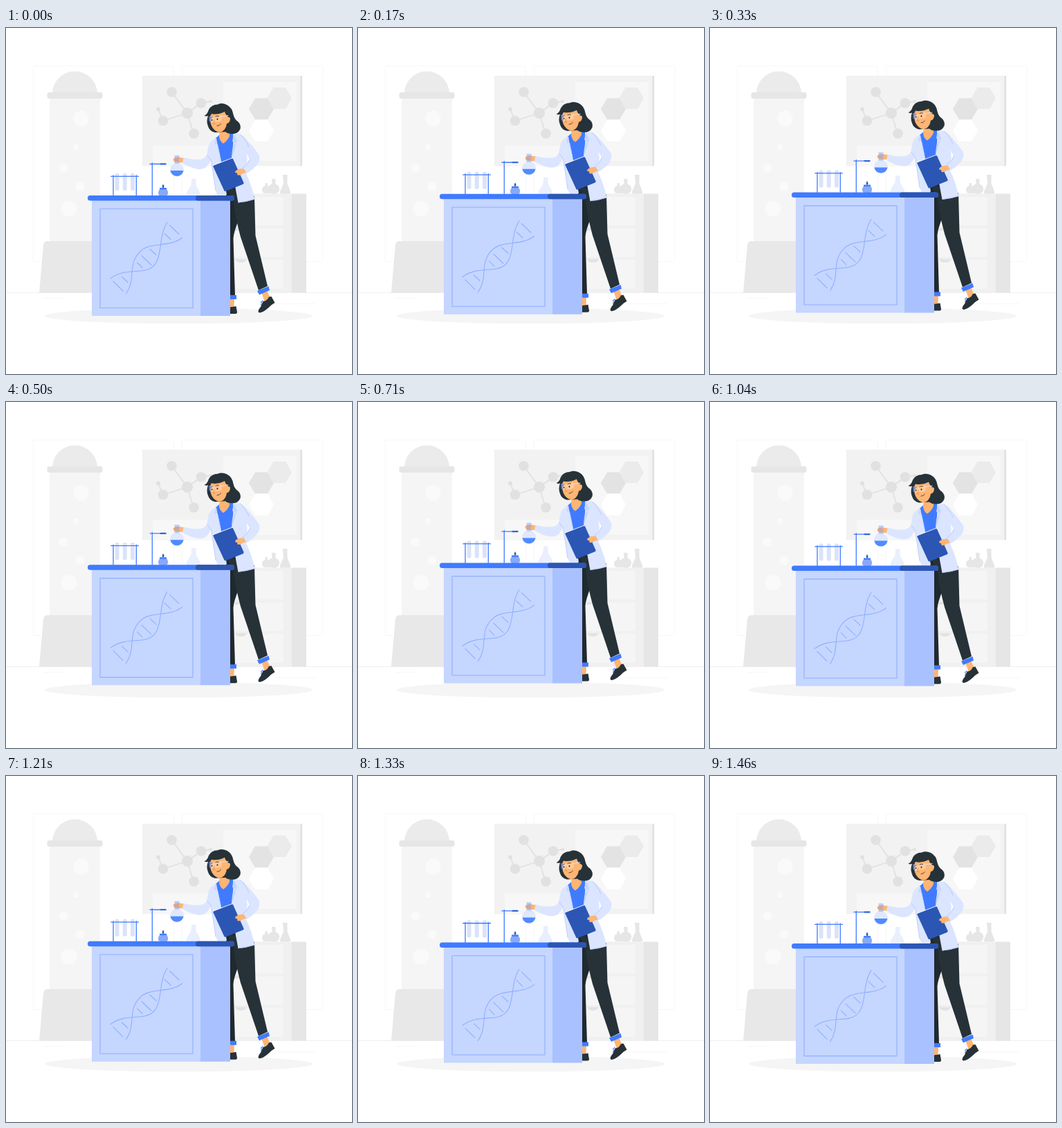
Write an HTML page that moves like this. It is 500 px wide and 500 px high and loops after 1.5 s.

```html
<!DOCTYPE html>
<html lang="en">
<head>
<meta charset="utf-8">
<title>Laboratory</title>
<style>
  html, body { margin: 0; height: 100%; overflow: hidden; background: #fff; }
  svg { display: block; width: 100%; height: 100%; }
  .line { fill: none; stroke-linecap: round; stroke-linejoin: round; }
</style>
</head>
<body>
<svg viewBox="0 0 500 500">
  <!-- room -->
  <g class="line" stroke="#f5f5f5" stroke-width=".8">
    <rect x="39" y="55" width="203.500" height="282.500" rx="3"/>
    <rect x="254.500" y="55" width="203.500" height="282.500" rx="3"/>
    <path stroke="#ebebeb" d="M0 382.500H500"/>
    <path d="M388 398.500H447M55 390.500H82"/>
  </g>
  <ellipse cx="249.500" cy="416" rx="193.500" ry="11.300" fill="#f5f5f5"/>

  <!-- bubble column -->
  <path fill="#f5f5f5" d="M63 101H136V309H63Z"/>
  <path fill="#ebebeb" d="M67 95A32.500 32.500 0 0 1 132 95Z"/>
  <rect x="59.500" y="93" width="80" height="9" rx="3" fill="#e6e6e6"/>
  <g fill="#fafafa">
    <circle cx="108.500" cy="131" r="11.300"/>
    <circle cx="101.500" cy="172" r="4"/>
    <circle cx="83" cy="202" r="6.500"/>
    <circle cx="107" cy="229" r="6.300"/>
    <circle cx="91" cy="261" r="11.300"/>
  </g>
  <path fill="#e8e8e8" d="M48 382.500L54 314Q54.500 308 60 308H139Q145 308 145.500 314L151 382.500Z"/>

  <!-- board -->
  <path fill="#f2f2f2" d="M197 69H426V199.500H197Z"/>
  <path fill="#e0e0e0" d="M425.500 69H428V199.500H425.500Z"/>
  <path fill="#f7f7f7" d="M314 78H420V192H314ZM212 170H302V199.500H212Z"/>
  <path fill="#e3e3e3" d="M351 117L360 101.500H378L387 117L378 132.500H360Z"/>
  <path fill="#ebebeb" d="M377.500 101.500L386.500 86H404L413 101.500L404 117H386.500Z"/>
  <path fill="#fff" d="M351 148.500L360 132.500H378L387 148.500L378 164H360Z"/>
  <g fill="#e1e1e1">
    <path class="line" stroke="#e1e1e1" stroke-width="1.800" d="M239.500 92.500L262 123L227 134L220 117.500M271 152.500L262 123L282 108.500L296 106"/>
    <circle cx="239.500" cy="92.500" r="7.300"/>
    <circle cx="227" cy="134" r="7.300"/>
    <circle cx="262" cy="123" r="8"/>
    <circle cx="282" cy="108.500" r="7.300"/>
    <circle cx="271.500" cy="152.500" r="7.300"/>
    <circle cx="220" cy="117.500" r="3"/>
    <circle cx="296" cy="106" r="2"/>
  </g>

  <!-- cabinet -->
  <path fill="#f0f0f0" d="M300 239.500H414V382.500H300Z"/>
  <path fill="#e6e6e6" d="M413 239.500H434V382.500H413Z"/>
  <path fill="#f5f5f5" d="M300 244H401V285.500H300ZM300 289.500H401V331H300ZM300 335H401V377H300Z"/>
  <path fill="#e3e3e3" d="M331 334H348Q346 339 339.500 339T331 334ZM331 289H340Q338 293 331 293Z"/>
  <g fill="#e6e6e6">
    <path d="M374.500 224H378V228A6 6 0 0 1 380 239H373A6 6 0 0 1 374.500 228Z"/>
    <path d="M384 218H389.500V225.500A7.300 7.300 0 0 1 390 239.500H383.500A7.300 7.300 0 0 1 384.500 225.500Z"/>
    <path d="M400 212H406.500V225L411 236Q412 239.500 409 239.500H398Q395 239.500 396 236L401 225Z"/>
  </g>

  <g id="floating">
    <!-- legs -->
    <path fill="#ffb573" d="M323 391H330L329.500 404H323ZM369 382L377 379L382 391L374 396Z"/>
    <path fill="#1f292e" d="M318 230H340L337 275Q329 295 328.500 304L331 387H318Z"/>
    <path fill="#263238" d="M318 230L359 243L360.500 300L378 373L365 379L339 302Q330 268 329 250Z"/>
    <path fill="#407bff" d="M318 386H333V392H318ZM363 380L379.500 373.300L381 379L366 385.500Z"/>
    <path fill="#263238" d="M318 402.500Q326 404 332.500 402L334 410.500Q334 413 331.500 413H318ZM364.500 410Q364.500 407 368 403L371.500 395Q377 395 380 388.500L383.500 388L388.500 397Q383 400 379 404.500Q371 411.500 366 411.500Z"/>
    <path class="line" stroke="#407bff" stroke-width="1.200" d="M371 394L368.500 396.500M370 397.500L368.500 400"/>

    <!-- torso -->
    <path fill="#407bff" d="M302 160L309 154L328 152L331 230L306 232Z"/>
    <path fill="#dbe5ff" d="M304 159Q294 163 292.500 171L290 184Q287 189.500 279 190Q266 190.500 256 187L254.500 195Q267 202.500 278 204Q287 204.500 291 199L296.500 191L303 235L306.500 243L319 241L311 193L305 165Z"/>
    <path fill="#dbe5ff" d="M329 152.500Q339 152 344 157Q357 171 365.500 183Q368 189 364 196Q357 205 347 210.500Q355 227 359.500 247.500Q348 251.500 335.500 252.500L328 212Q325 187 328.500 166Z"/>
    <path fill="#c5d6ff" d="M303 159L301.500 168L306 168L310 187L311 194L304 165ZM329 152.500L327 164L331.500 165.500L327 176L325.500 191L334 163Z"/>
    <path fill="#fff" d="M347 181Q351.500 187 351.500 190L348 196Q350 189 347 181Z"/>
    <path class="line" stroke="#a9c0ff" stroke-width=".7" d="M338 153Q348 163 351 172M352 190Q350 197 342 202M291 184L296.500 191L303 235M336 252Q350 250 359 247.500"/>
    <path fill="#ffb573" d="M309 146L322 143L323 156Q320 163 314 167Q309 164 308 157Z"/>

    <!-- head -->
    <path fill="#263238" d="M286.500 126.500Q291 125 293 118Q297 110.500 306 110.500Q312 107.500 319 111Q327 115 328.500 125Q330 132 335.500 135.500Q340 140 338.500 146Q335 153.500 327 153Q320 153 317 150L302 151Q294 149 292 142Q289 135 292 127Q289 128 286.500 126.500Z"/>
    <path fill="#ffb573" d="M297 124Q306 126 316 121Q318 127 322 129Q325 129 323.500 134Q322 138 319 138Q318 146 312.500 149.500Q306 152.500 300 146Q295.500 141 295 133Q294.500 127 297 124Z"/>
    <path fill="#407bff" d="M293 128L295.500 127L295.500 136L293.500 135Z"/>
    <path fill="#fff" fill-opacity=".3" d="M295.500 128Q303 130 311 125.500L312 133Q307 137 303 135Q298 138 296 136Z"/>
    <path class="line" stroke="#dbe5ff" stroke-width="1" d="M311 128L321 126.500"/>
    <g fill="#263238">
      <ellipse cx="305.500" cy="131.800" rx=".9" ry="1.300"/>
      <ellipse cx="297.500" cy="133" rx=".8" ry="1.200"/>
    </g>
    <path class="line" stroke="#263238" stroke-width=".8" d="M303 128Q305 126.500 307.500 127.500M296 130L298 129M305 141.500Q308.500 141.500 310.500 138.500"/>
    <path class="line" stroke="#ed893e" stroke-width=".9" d="M301 133L299.500 138.500L302 138.500"/>

    <!-- clipboard -->
    <path fill="#2c56b3" d="M300 198.500L326 188.500Q327.500 188 328.200 189.500L343.500 223.500Q344 225 342.500 225.800L317.500 235.800Q316 236.300 315.300 235L299.500 200.500Q299 199 300 198.500Z"/>
    <path class="line" stroke="#fff" stroke-width=".9" d="M299 198.500L327 187.800"/>
    <path fill="#ffb573" d="M343.500 203L338 203.500Q332 205 331 208Q331.500 210 334 209.500L334.500 212.500Q339 213.500 342 210.500L347 209Z"/>

    <!-- flask and hand -->
    <path fill="#e9effd" d="M268 218H274.500V227L280.500 238Q282 242 278.500 242H263Q259.500 242 261 238L267.500 227Z"/>
    <path fill="#ffb573" d="M256.500 188L249 186.500Q242 187 241.500 190Q242 194 248 194.500L255 194.500Z"/>
    <circle cx="247" cy="205" r="10" fill="#dfe8fd"/>
    <path fill="#508aff" d="M237.500 206H256.500A9.600 9.300 0 0 1 237.500 206Z"/>
    <path fill="#8fabef" fill-opacity=".55" d="M243.500 184H250.500V196H243.500Z"/>
    <path class="line" stroke="#eb9466" stroke-width=".8" d="M243 189.500L249 188.500M243.500 192L249 191.500"/>

    <!-- desk equipment -->
    <g fill="#dae3f9">
      <rect x="157.500" y="210" width="6" height="25" rx="2.500"/>
      <rect x="168.700" y="210" width="6" height="25" rx="2.500"/>
      <rect x="180" y="210" width="6" height="25" rx="2.500"/>
    </g>
    <g class="line" stroke="#407bff" stroke-width="1.300">
      <path d="M151.700 214.300H191.500M155 213V242M188.300 213V242M211.300 195V242M208 196.500H231"/>
      <path stroke="#2c66dd" stroke-width="2.200" d="M223.500 196.500H230.500"/>
    </g>
    <path fill="#2c56b3" d="M227 225.500Q230 230 227 231.500Q224.500 230 227 225.500Z"/>
    <path fill="#87a9f8" d="M223 232H231Q234.500 235 234 239Q233.500 242.500 231 242.500H223Q220 242 220 238Q220 235 223 232Z"/>
    <path fill="#407bff" d="M222 231H232V233.300H222Z"/>

    <!-- desk -->
    <path fill="#c5d6ff" d="M124 248H281V416H124Z"/>
    <path fill="#a9c1ff" d="M281 248H324V416H281Z"/>
    <rect x="118" y="242" width="212" height="7.500" rx="3.500" fill="#407bff"/>
    <rect x="274" y="242" width="56" height="7.500" rx="3.500" fill="#2c56b3"/>
    <g class="line" stroke="#8fb0ff" stroke-width="1.100">
      <rect x="136" y="261.300" width="134" height="143.200"/>
      <path d="M151 362C168 349 188 353 201 350C231 344 217 304 233 281"/>
      <path d="M173.500 384C189 362 174 341 195 322C209 309 238 317 254.500 303"/>
      <path d="M155 366L169 380M167.500 359.500L176 367.500M189.500 339L197 346.500M196 329L210 342.500M208 319.500L217 328M229 297L238 305.500M236.500 285L250 298"/>
    </g>
  </g>
</svg>
<script>
  const LOOP = 1500, STEPS = 36, RISE = 10;
  const floating = document.getElementById('floating');

  // Linear rise and fall, advancing in 24 steps per second.
  function draw(now) {
    const step = Math.floor(((now + 6) % LOOP) / LOOP * STEPS);
    const phase = ((step + 0.6) / STEPS) % 1;
    const lift = 1 - Math.abs(1 - 2 * phase);
    floating.setAttribute('transform', `translate(0 ${(0.33 - RISE * lift).toFixed(2)})`);
  }

  let start;
  function tick(now) {
    start ??= now;
    draw(now - start);
    requestAnimationFrame(tick);
  }
  draw(0);
  requestAnimationFrame(tick);
</script>
</body>
</html>
```
